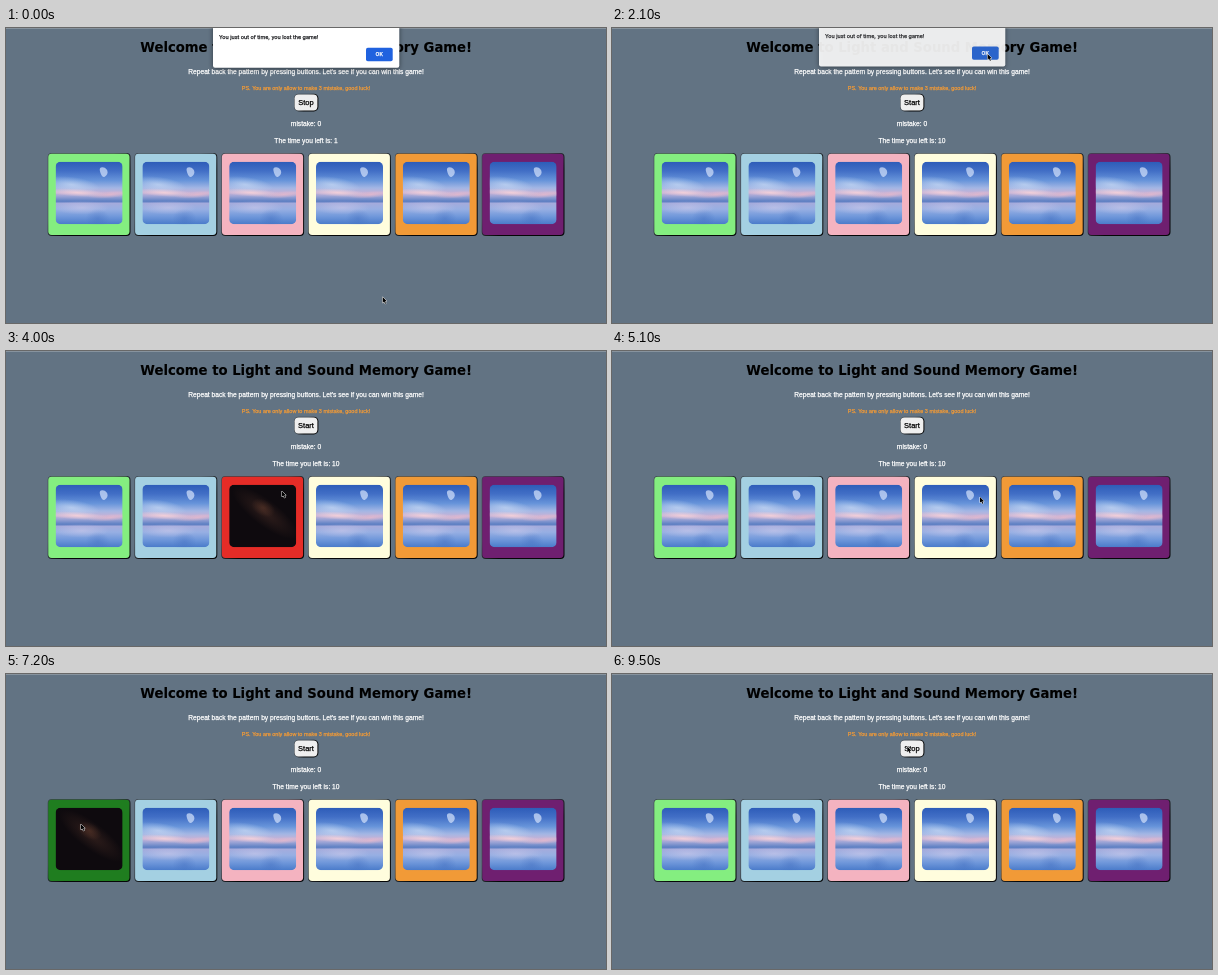
An HTML page with a canvas for the animation above (9.6 s loop, 600x295 px).

```html
<!DOCTYPE html>
<html lang="en">
<head>
<meta charset="utf-8">
<title>Light and Sound Memory Game</title>
<style>
  html, body { margin: 0; width: 100%; height: 100%; overflow: hidden; background: #627383; }
  canvas { display: block; width: 600px; height: 295px; }
</style>
</head>
<body>
<canvas id="stage" width="600" height="295"></canvas>
<script>
const ctx = document.getElementById('stage').getContext('2d');
const LOOP = 9600, STEP = 100;
const SANS = '"Liberation Sans", Arial, sans-serif';
const TILE = { left: 41.7, top: 125.1, pitch: 86.8, size: 82.8 };
const PHOTO = { dx: 7.9, dy: 8.6, w: 67, h: 62.5 };

// Idle colour, lit colour, and when the tile is held down.
const tiles = [
  { idle: '#84ee80', lit: '#1f7d1f', from: 7000, to: 7300 },
  { idle: '#a4d0e2', lit: '#1b38f2', from: 8000, to: 8300 },
  { idle: '#f4b3c0', lit: '#e52c27', from: 3900, to: 4200 },
  { idle: '#fffddd', lit: '#fdf735', from: 4800, to: 5100 },
  { idle: '#f19a37', lit: '#eb5528', from: 5500, to: 5800 },
  { idle: '#6f1f70', lit: '#000000', from: 6100, to: 6400 }
];

// Pointer stops: arrival, departure, position.
const stops = [
  [0, 300, 376.7, 269],
  [1700, 2300, 375.6, 26],
  [3700, 4200, 276, 140],
  [4700, 5100, 368, 146],
  [5500, 5700, 435, 147],
  [6100, 6300, 507, 147.5],
  [7000, 7300, 75, 150],
  [8000, 8300, 155, 153.5],
  [9200, LOOP, 295.3, 72.5]
];

const smooth = u => u * u * (3 - 2 * u);

function pointerAt(t) {
  let i = stops.length - 1;
  while (i > 0 && t < stops[i][0]) i--;
  const [, leave, x, y] = stops[i];
  if (t <= leave) return [x, y];
  const [arrive, , nx, ny] = stops[i + 1];
  const u = smooth((t - leave) / (arrive - leave));
  return [x + (nx - x) * u, y + (ny - y) * u];
}

function box(x, y, w, h, r, fill) {
  ctx.beginPath();
  ctx.roundRect(x, y, w, h, r);
  ctx.fillStyle = fill;
  ctx.fill();
}

// Rounded panel with an outset edge: grey at top left, black at bottom right.
function bevel(x, y, w, h, r, fill) {
  const edge = ctx.createLinearGradient(x, y, x + w, y + h);
  edge.addColorStop(0.4, '#3c444b');
  edge.addColorStop(0.6, '#050607');
  box(x, y, w, h, r, edge);
  box(x + 0.6, y + 0.6, w - 1.6, h - 1.6, r - 0.6, fill);
}

// A hairline stroke gives small text a slightly heavier weight.
function text(str, x, y, font, fill, align = 'center', weight = 0.25) {
  ctx.font = font;
  ctx.fillStyle = ctx.strokeStyle = fill;
  ctx.textAlign = align;
  ctx.lineWidth = weight;
  ctx.lineJoin = 'round';
  ctx.fillText(str, x, y);
  ctx.strokeText(str, x, y);
}

function gradient(y0, y1, colors) {
  const g = ctx.createLinearGradient(0, y0, 0, y1);
  colors.forEach(([at, color]) => g.addColorStop(at, color));
  return g;
}

function glow(x, y, rx, ry, angle, rgb, alpha) {
  ctx.save();
  ctx.translate(x, y);
  ctx.rotate(angle);
  ctx.scale(rx, ry);
  const g = ctx.createRadialGradient(0, 0, 0, 0, 0, 1);
  g.addColorStop(0, `rgba(${rgb},${alpha})`);
  g.addColorStop(1, `rgba(${rgb},0)`);
  ctx.fillStyle = g;
  ctx.fillRect(-1, -1, 2, 2);
  ctx.restore();
}

function moon(x, y, r) {
  ctx.save();
  ctx.translate(x, y);
  ctx.rotate(-0.35);
  ctx.beginPath();
  ctx.arc(0, 0, r, -Math.PI / 2, Math.PI / 2);
  ctx.ellipse(0, 0, r * 0.45, r, 0, Math.PI / 2, Math.PI * 1.5);
  ctx.fillStyle = 'rgba(205,220,248,.75)';
  ctx.fill();
  ctx.restore();
}

function seascape(w, h) {
  ctx.fillStyle = gradient(0, h, [
    [0, '#2d5cb8'], [0.15, '#426fc6'], [0.3, '#6794da'], [0.42, '#a3b6e4'],
    [0.5, '#c6b2d6'], [0.55, '#9ea5d6'], [0.62, '#6685c6'], [0.645, '#5f7fc2'],
    [0.66, '#a5abdc'], [0.76, '#97afe3'], [0.88, '#6f97da'], [1, '#4a7bca']
  ]);
  ctx.fillRect(0, 0, w, h);
  glow(16, 23, 28, 8, 0.12, '205,222,246', 0.65);
  glow(22, 31, 30, 4, 0.06, '252,214,218', 0.8);
  glow(54, 33, 22, 3.5, -0.08, '246,190,202', 0.65);
  glow(26, 46, 28, 7, 0, '212,206,236', 0.5);
  glow(42, 57, 12, 10, 0, '64,108,190', 0.4);
  moon(47, 10.5, 5);
}

function nightSky(w, h) {
  ctx.fillStyle = '#0e0a0e';
  ctx.fillRect(0, 0, w, h);
  glow(36, 28, 40, 13, 0.65, '78,48,40', 0.5);
  glow(34, 23, 13, 8, 0.5, '110,66,48', 0.45);
}

function drawTile(tile, i, t) {
  const lit = t >= tile.from && t < tile.to;
  const x = TILE.left + i * TILE.pitch, y = TILE.top;
  bevel(x, y, TILE.size, TILE.size, 4, lit ? tile.lit : tile.idle);
  ctx.save();
  ctx.translate(x + PHOTO.dx, y + PHOTO.dy);
  ctx.beginPath();
  ctx.roundRect(0, 0, PHOTO.w, PHOTO.h, 5);
  ctx.clip();
  (lit ? nightSky : seascape)(PHOTO.w, PHOTO.h);
  ctx.restore();
}

function drawButton(label) {
  bevel(288, 65.8, 24.4, 17.6, 4.5, '#efefef');
  text(label, 300, 77.2, `7.5px ${SANS}`, '#000');
}

function drawDialog(t) {
  const closing = Math.max(0, (t - 2000) / 100);
  const alpha = 1 - 0.1 * closing ** 2.5;
  if (alpha <= 0) return;
  ctx.save();
  ctx.globalAlpha = alpha;
  ctx.translate(0, -1.4 * closing);
  ctx.shadowColor = 'rgba(0,0,0,.5)';
  ctx.shadowBlur = 5;
  ctx.shadowOffsetY = 1;
  box(207, -8, 186.3, 47.8, 2, '#fff');
  ctx.shadowColor = 'transparent';
  text('You just out of time, you lost the game!', 213, 11.3, '5.42px Inter, sans-serif', '#1c1d20', 'left');
  box(360, 19.8, 26.7, 13.4, 1.8, t >= 1700 ? '#1655c6' : '#2062df');
  text('OK', 373.3, 28.3, '600 5px Inter, sans-serif', '#fff');
  ctx.restore();
}

function drawPointer([x, y]) {
  ctx.save();
  ctx.translate(x, y);
  ctx.scale(0.9, 0.9);
  ctx.beginPath();
  [[0, 0], [0, 6.4], [1.5, 5.1], [2.6, 7.6], [3.7, 7.1], [2.6, 4.7], [4.6, 4.6]]
    .forEach(([px, py]) => ctx.lineTo(px, py));
  ctx.closePath();
  ctx.lineJoin = 'round';
  ctx.lineWidth = 1.1;
  ctx.strokeStyle = '#f4f4f4';
  ctx.stroke();
  ctx.fillStyle = '#000';
  ctx.fill();
  ctx.restore();
}

function draw(t) {
  const lost = t < 2050;
  ctx.fillStyle = '#627383';
  ctx.fillRect(0, 0, 600, 295);
  ctx.fillStyle = '#87939e';
  ctx.fillRect(0, 0, 600, 1);

  const body = `6.67px ${SANS}`;
  text('Welcome to Light and Sound Memory Game!', 300.2, 24, 'bold 13.22px Verdana, "DejaVu Sans", sans-serif', '#000', 'center', 0.1);
  text("Repeat back the pattern by pressing buttons. Let's see if you can win this game!", 300, 45.6, body, '#fff');
  text('PS. You are only allow to make 3 mistake, good luck!', 300, 62, `5.48px ${SANS}`, '#f19a37');
  drawButton(lost || t >= 9400 ? 'Stop' : 'Start');
  text('mistake: 0', 300, 97.7, body, '#fff');
  text('The time you left is: ' + (lost ? 1 : 10), 300, 114.6, body, '#fff');

  tiles.forEach((tile, i) => drawTile(tile, i, t));
  drawDialog(t);
  drawPointer(pointerAt(t));
}

const start = performance.now();
function tick() {
  const t = (performance.now() - start) % LOOP;
  draw(Math.floor(t / STEP) * STEP);
  requestAnimationFrame(tick);
}
tick();
</script>
</body>
</html>
```
